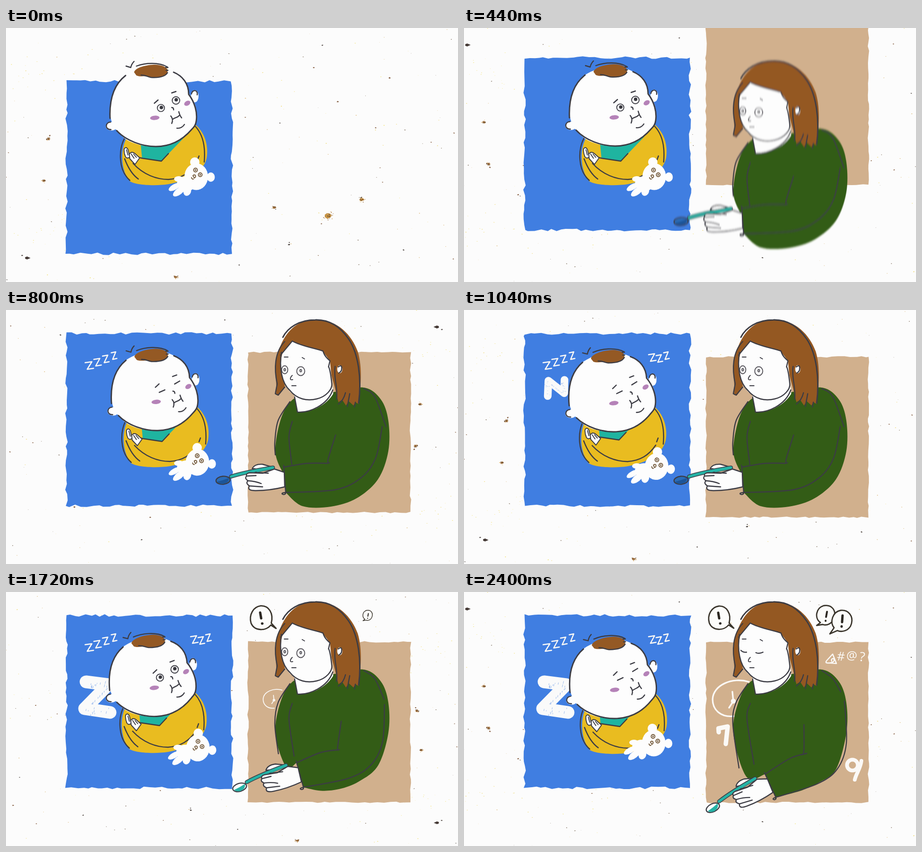
An HTML page for the animation above (2.44 s loop, 960x540 px).

```html
<!DOCTYPE html>
<html lang="en">
<head>
<meta charset="utf-8">
<title>Sleepy supper</title>
<style>
html, body { margin: 0; width: 100%; height: 100%; overflow: hidden; background: #fcfcfc; }
svg { display: block; width: 960px; height: 540px; }
.ln { fill: none; stroke: #3c3c44; stroke-width: 2.4; stroke-linecap: round; stroke-linejoin: round; }
.thin { stroke-width: 1.9; }
.bold { stroke-width: 2.9; }
.w { fill: #fdfdfd; }
.chalk { fill: none; stroke: #fbf9f6; stroke-width: 2.4; stroke-linecap: round; stroke-linejoin: round; }
.bub { fill: #fcfcfa; stroke: #3a352c; stroke-width: 2.8; stroke-linejoin: round; }
.bang { stroke: #2b2721; stroke-width: 5; stroke-linecap: round; }
text { font-family: "Open Sans", "Noto Sans", sans-serif; fill: #fbf9f6; }
</style>
</head>
<body>
<svg viewBox="0 0 960 540" xmlns="http://www.w3.org/2000/svg">
<defs>
  <filter id="blur" x="-10%" y="-10%" width="120%" height="120%"><feGaussianBlur id="blurAmt" stdDeviation="0 0"/></filter>
</defs>
<rect width="960" height="540" fill="#fcfcfc"/>
<g id="specks"></g>

<path id="tan" fill="#d1b08d"/>
<g id="clock" class="chalk" style="stroke-width:3.4">
  <path d="M605,191 C570,180 529,198 528,228 C528,252 547,267 573,264 M570,212 L572,232 L563,246"/>
  <circle cx="572" cy="232" r="3.5" fill="#fbf9f6"/>
</g>
<path id="seven" class="chalk" style="stroke-width:9.5" d="M541,298 L540.5,290 L560,286 L556,323"/>
<g id="nine" class="chalk" style="stroke-width:8"><circle cx="825" cy="368" r="11.5"/><path d="M844,359 C842,376 833,385 830,399"/></g>
<path id="swear0" class="chalk" d="M781,147 C779,142 785,139 786,144 C787,150 778,151 773,151 C767,151 768,148 772,144 L783,132 L791,152 L779,151"/>
<text id="swear1" x="792" y="146" font-size="26" transform="rotate(4 802 137)">#</text>
<text id="swear2" x="812" y="144" font-size="26">@</text>
<text id="swear3" x="840" y="147" font-size="27" transform="rotate(8 845 137)">?</text>

<path id="blue" fill="#407ee1"/>
<g id="zs"></g>
<g id="bigZ">
  <path d="M-26,-32 L21,-26 L-29,25 L25,33" fill="none" stroke="#fafafa" stroke-width="27" stroke-linecap="round" stroke-linejoin="round"/>
  <g id="scratch" stroke="#5a8fe4" stroke-width="1"></g>
</g>

<g id="body">
  <path fill="#e9bc20" d="M256,234 C243,258 243,300 262,325 C275,335 320,336 345,332 C385,325 425,305 427,270 C429,245 421,222 403,206 Z"/>
  <path class="ln" d="M252,234 C239,258 238,302 263,324 M252,278 C258,294 267,311 281,321 M270,288 C292,312 320,322 345,322 C372,320 390,309 405,287 M402,209 C418,226 424,252 421,285 M410,272 L407,280"/>
</g>
<g id="collar">
  <path fill="#1fb4a0" d="M286,246 L289,277 L330,283 L380,231 Z"/>
  <path class="ln" d="M281,275 L290,277 L330,283 L345,267"/>
</g>
<g id="palms" class="ln thin" style="fill:#fdfdfd">
  <path d="M251,257 Q255,251 259,258 L263,274 Q258,279 254,274 Q250,266 251,257Z M256,259 L259,270"/>
  <path d="M262,268 Q267,261 274,267 L284,276 L274,290 L263,278Z M266,268 L272,277 M271,268 L277,275"/>
</g>
<g id="head">
  <ellipse class="w" cx="401" cy="145" rx="8" ry="13"/>
  <ellipse class="w" cx="224" cy="209" rx="12" ry="9"/>
  <path class="w" d="M252,102 C232,116 221,145 221,180 C222,205 235,222 255,237 C280,252 320,257 350,247 C385,233 402,212 405,190 C406,165 397,150 388,138 C386,115 376,103 356,94 C330,78 285,80 252,102Z"/>
  <path class="ln bold" d="M254,101 C232,118 219,148 221,192 M235,218 C255,240 290,252 318,252 C350,252 375,238 394,216 C400,210 403,206 404,198 C407,180 401,158 388,141 C388,118 375,102 356,94"/>
  <path class="ln" d="M222,200 C211,200 209,216 223,216 M394,140 C396,130 408,131 406,142"/>
  <path fill="#945924" d="M272,94 C275,84 298,78 318,78 C336,79 345,86 343,93 C341,103 325,106 306,105 C299,100 286,105 277,101 Z"/>
  <path class="ln" d="M277,81 C295,74 325,72 343,83 M287,100 C298,100 300,104 308,105 C325,106 338,104 343,95 M339,84 L344,84 M340,90 L344,90 M255,81 L265,84 C266,79 268,75 272,71"/>
  <path class="ln" d="M315,160 L323,153 M352,138 L361,135 M352,169 Q356,169 356,174 M350,187 Q356,194 352,203 M354,194 C359,190 364,191 368,186 M367,178 Q369,186 373,191 M363,213 C370,214 376,210 379,205"/>
  <ellipse cx="316" cy="191" rx="10" ry="4.6" fill="#b582b8" transform="rotate(-4 316 191)"/>
  <ellipse cx="385" cy="160" rx="7" ry="4.8" fill="#b582b8" transform="rotate(-30 385 160)"/>
  <g id="babyOpen" class="ln thin">
    <circle cx="329" cy="170" r="7.6"/><circle cx="330" cy="169" r="2.8" fill="#333338"/>
    <circle cx="361" cy="154" r="8"/><circle cx="361.5" cy="152.5" r="2.8" fill="#333338"/>
  </g>
  <path id="babyShut" class="ln" d="M323,171 L335,166 M356,154 L367,148"/>
</g>
<g id="bearBody" class="w">
  <ellipse cx="383" cy="331" rx="20" ry="16"/>
  <ellipse cx="367" cy="321" rx="10" ry="6"/>
  <ellipse cx="358" cy="338" rx="14" ry="6" transform="rotate(-30 358 338)"/>
  <ellipse cx="368" cy="347" rx="16" ry="7" transform="rotate(-38 368 347)"/>
  <ellipse cx="385" cy="347" rx="8" ry="10" transform="rotate(20 385 347)"/>
</g>
<g id="bearHead">
  <g class="w"><ellipse cx="404" cy="316" rx="25" ry="28.5"/><circle cx="401" cy="285" r="10"/><ellipse cx="435" cy="317" rx="8.5" ry="10"/></g>
  <g fill="none" stroke="#73593a" stroke-width="1.9" stroke-linecap="round">
    <circle cx="402.5" cy="302" r="4"/><circle cx="402.5" cy="302" r=".8"/>
    <circle cx="412.5" cy="312" r="4"/><circle cx="412.5" cy="312" r=".8"/>
    <path d="M394,318 Q395,322 398,321 M397,314 L400,319 Q404,317 402,313 Q399,311 397,314"/>
  </g>
</g>

<g id="woman">
  <path id="torso" fill="#335c16"/>
  <path id="folds" class="ln"/>
  <g id="grip">
    <path class="ln w" style="fill:#fdfdfd" d="M523,337 Q528,327 545,328 L562,333 L545,340 Z"/>
    <path class="ln" style="stroke-width:8.5" d="M478,354 Q510,344 567,335"/>
    <path class="ln" style="stroke:#25b3a6;stroke-width:5.5" d="M478,354 Q510,344 567,335"/>
    <g transform="translate(461 362) rotate(-5)">
      <ellipse id="bowl" class="ln" rx="15" ry="8.5"/>
      <path id="dip" d="M-13,2 Q0,0 13,-4 Q12,6 0,8 Q-8,8 -13,2Z"/>
    </g>
    <path class="ln" style="fill:#fdfdfd" d="M511,353 Q509,347 518,346 L545,347 L570,338 L591,345 L592,376 Q560,384 530,384 Q511,384 517,374 Q508,368 514,363 Q506,358 511,353Z"/>
    <path class="ln" d="M511,353 L531,352 M514,363 Q530,364 542,369 M517,374 L545,376 M530,345 L557,347"/>
    <path style="stroke:#25b3a6;stroke-width:5.5" d="M533,342 L567,335"/>
  </g>
  <path class="w" d="M612,180 L619,217 C645,219 680,204 695,178 L692,150 Z"/>
  <path class="ln" d="M613,185 L619,217 C645,219 683,202 694,170"/>
  <path fill="#945822" d="M573,180 C578,158 564,112 583,76 C598,40 624,20 658,20 C705,21 734,53 747,88 C758,124 753,165 749,200 L742,196 L738,203 L728,194 L722,203 L714,191 L706,196 L697,160 L684,112 L608,66 L588,92 L592,165 L579,182 Z"/>
  <path class="w" d="M608,66 C626,76 650,80 673,88 L688,108 L693,160 C688,182 665,192 645,192 C618,191 598,172 591,156 C582,138 582,105 588,90 Z"/>
  <ellipse class="w" cx="709" cy="126" rx="5.5" ry="8.5"/>
  <path class="ln bold" d="M588,58 C598,38 622,21 657,21 C690,20 712,38 728,62 C748,92 756,145 749,198"/>
  <path class="ln" d="M592,67 C570,90 569,125 576,157 L572,178 L578,181 L592,164 M585,90 C580,122 585,155 603,171 C618,190 640,194 660,189 C681,184 693,168 692,157 C690,140 689,128 685,120 M583,96 L608,66 C625,76 650,80 673,87 C677,98 680,101 688,108 L685,121 M699,120 C695,146 706,166 702,190 M721,176 Q717,192 706,200 M730,178 L725,205 M742,196 L740,206 M706,121 Q713,115 713,124 Q713,131 707,134"/>
  <path class="ln thin" d="M591,100 L599,100 M629,101 L634,104 M608,139 C603,144 602,150 609,148 M607,161 L616,161"/>
  <g id="momOpen" class="ln thin" style="stroke:#55535a">
    <ellipse cx="592" cy="127" rx="6.5" ry="8.5"/><ellipse cx="592" cy="127" rx="1.8" ry="2.5"/>
    <ellipse cx="626" cy="130" rx="8.5" ry="9.5"/><ellipse cx="626" cy="129" rx="1.8" ry="2.5"/>
  </g>
  <path id="momShut" class="ln" d="M588,124 Q593,129 600,128 M620,129 Q627,132 635,128"/>
</g>

<g id="bub0"><path class="bub" d="M562,70 C552,83 528,83 521,66 C516,48 526,32 541,30 C559,29 568,47 563,66 L573,77 Z"/>
  <path id="bang0" class="bang" d="M541,44 L542,56 M543,67 L543.5,67"/></g>
<g id="bub1"><path class="bub" d="M757,65 C744,56 747,34 764,29 C782,26 791,40 786,55 C782,68 770,72 762,69 L749,71 Z"/>
  <path class="bang" d="M771,42 L769,53 M768,61 L768,61.5" style="stroke-width:4"/></g>
<g id="bub2"><path class="bub" d="M786,76 C776,64 783,42 800,39 C817,37 827,52 823,67 C819,83 802,86 793,82 L777,89 Z"/>
  <path class="bang" d="M804,50 L803,64 M802,73 L802,73.5"/></g>
</svg>
<script>
const LOOP = 2440, STEP = 40;
const $ = id => document.getElementById(id);
const clamp = v => Math.max(0, Math.min(1, v));
const mix = (a, b, p) => a + (b - a) * p;
const span = (t, from, to) => clamp((t - from) / (to - from));
const ease = (t, from, to) => { const p = span(t, from, to); return p * p * (3 - 2 * p); };
const show = (id, on) => { $(id).style.display = on ? '' : 'none'; };
const move = (id, x, y, extra = '') => $(id).setAttribute('transform', `translate(${x} ${y}) ${extra}`);

function make(tag, attrs, parent) {
  const el = document.createElementNS('http://www.w3.org/2000/svg', tag);
  for (const k in attrs) el.setAttribute(k, attrs[k]);
  parent.appendChild(el);
}

function rng(seed) {
  let s = seed * 7919 + 17;
  return () => {
    s = (s + 0x6D2B79F5) | 0;
    let r = Math.imul(s ^ (s >>> 15), 1 | s);
    r = (r + Math.imul(r ^ (r >>> 7), 61 | r)) ^ r;
    return ((r ^ (r >>> 14)) >>> 0) / 4294967296;
  };
}

// Smooth curve through points; a doubled point makes a corner
function curve(pts) {
  const at = i => pts[Math.max(0, Math.min(pts.length - 1, i))];
  const bend = (b, a, c, k) => [b[0] + (c[0] - a[0]) * k, b[1] + (c[1] - a[1]) * k];
  let d = 'M' + pts[0];
  for (let i = 0; i < pts.length - 1; i++) {
    const [a, b, c, e] = [at(i - 1), at(i), at(i + 1), at(i + 2)];
    d += `C${bend(b, a, c, 1 / 6)} ${bend(c, b, e, -1 / 6)} ${c}`;
  }
  return d;
}

// Torn paper edge
function torn(x, y, w, h, amp, seed) {
  const r = rng(seed), pts = [];
  const edge = (x0, y0, dx, dy, len) => {
    for (let s = 0; s < len - 5; s += 7 + r() * 8) {
      const j = (r() - .5) * 2 * amp;
      pts.push([x0 + dx * s + Math.abs(dy) * j, y0 + dy * s + Math.abs(dx) * j]);
    }
  };
  edge(x, y, 1, 0, w);
  edge(x + w, y, 0, 1, h);
  edge(x + w, y + h, -1, 0, w);
  edge(x, y + h, 0, -1, h);
  return 'M' + pts.join('L') + 'Z';
}

function speck(x, y, size, fill, r) {
  const pts = [];
  for (let i = 0; i < 7; i++) {
    const a = i / 7 * Math.PI * 2, q = size * (.6 + r() * .6);
    pts.push([x + Math.cos(a) * q * 1.15, y + Math.sin(a) * q * .8]);
  }
  make('polygon', { points: pts.join(' '), fill }, $('specks'));
}

function flake(x, y, size, r) {
  const tones = ['#b98a4c', '#8a5a2c', '#d9a85c', '#3d2d22'];
  speck(x, y, size * .85, size > 5 ? '#c59245' : '#95673a', r);
  for (let k = 0; k < size * 4; k++) {
    const a = r() * 6.28, q = r() * size * 1.2;
    speck(x + Math.cos(a) * q * 1.2, y + Math.sin(a) * q * .9, .5 + r() * .7, tones[k % 4], r);
  }
}

function buildSpecks() {
  const r = rng(5), x = () => r() * 1050 - 20, y = () => r() * 620 - 40;
  flake(685, 399, 9, r);
  flake(755, 365, 7, r);
  flake(570, 382, 4, r);
  flake(80, 325, 4, r);
  flake(90, 236, 4, r);
  flake(361, 529, 4, r);
  speck(46, 489, 4.6, '#453a36', r);
  for (let i = 0; i < 42; i++) speck(x(), y(), 1 + r() * r() * 2, i % 3 ? '#80583a' : '#4a413c', r);
  const tiny = ['#f2e27a', '#efd873', '#7a6a58', '#d8b06a'];
  for (let i = 0; i < 200; i++) speck(x(), y(), .4 + r() * .8, tiny[i % 4], r);
  for (let i = 0; i < 40; i++) speck(75 + (r() - r()) * 75, (i % 2 ? 100 : 425) + (r() - r()) * 55, .5 + r() * .5, tiny[i % 2], r);
}
const FLIPS = ['scale(1)', 'translate(-38 525) scale(1 -1)', 'translate(957.5 31) scale(-.94 .94)', 'translate(960 525) scale(-1)'];

function buildZs() {
  for (let i = 0; i < 7; i++) {
    const j = i - 4, left = i < 4;
    const x = left ? 168 + 18.5 * i : 392 + 16 * j, y = left ? 110 - 7 * i : 93 + 4 * (j % 2) - 2 * j;
    const w = left ? 18 - 2 * i : 16 - 2 * j, h = 16;
    make('path', { id: 'z' + i, class: 'chalk', d: `M${x},${y + 2} l${w * .8},-2 l${-w * .55},${h} l${w * .75},-2` }, $('zs'));
  }
  const r = rng(9);
  for (let i = 0; i < 34; i++) {
    const u = r() * 2 - 1, row = i % 3 - 1, n = 2 + r() * 4;
    const y = row ? row * 29 + (r() - .5) * 16 : -u * 20;
    make('path', { d: `M${u * (row ? 28 : 20)},${y} l${-n * .2},${n}`, opacity: .6 }, $('scratch'));
  }
}

function pop(id, t, start, x, y) {
  show(id, t >= start);
  const p = span(t, start - STEP, start + 120);
  const s = 1 + Math.sin(p * Math.PI) * .12 - (1 - p) * (1 - p);
  move(id, x, y, `scale(${s}) translate(${-x} ${-y})`);
}

function drawPanels(t) {
  const seed = Math.floor(t / 80);
  $('blue').setAttribute('d', torn(128.5, 113.5 - 63.5 * ease(t, 195, 540), 351.5, 366.5, 2.8, seed + 1));
  const drop = 1 - span(t, 300, 540);
  const tanY = 106.5 - 41 * Math.exp(-Math.max(0, t - 560) / 271) - 420 * drop * drop;
  show('tan', t > 300);
  $('tan').setAttribute('d', torn(514, tanY, 345, 341, 1.6, seed + 101));
}

function drawBaby(t) {
  const sway = 3 * ease(t, 0, 280) - 4 * ease(t, 900, 1400) + 5 * ease(t, 2000, 2400);
  const tuck = ease(t, 560, 1040), sink = 8 * ease(t, 1000, 1400) + 2 * ease(t, 2000, 2400);
  move('head', sway, 18 * span(t, 560, 2400) ** .6 - ease(t, 0, 280), `rotate(${-2.8 * tuck} 316 191)`);
  move('body', sway, sink);
  move('collar', sway - 3 * tuck, sink - 7 * tuck);
  move('palms', sway + 4 * tuck, sink - 3 * tuck);

  const lift = ease(t, 1400, 2400), dip = 13 * ease(t, 480, 1250) - 14 * lift;
  move('bearBody', -6 * lift, dip);
  move('bearHead', 5 * tuck - 6 * lift, dip + 6 * tuck, `rotate(${9 * tuck * (1 - lift)} 404 316)`);

  const asleep = (t >= 480 && t < 1240) || t >= 2320;
  show('babyOpen', !asleep);
  show('babyShut', asleep);
}

// The sleeve ends where the turning hand begins
function drawArm(p) {
  const px = 568, py = 334, dx = 51 * p, dy = 61 * p, turn = -20.5 * p;
  move('grip', dx, dy, `rotate(${turn} ${px} ${py})`);
  const c = Math.cos(turn * Math.PI / 180), s = Math.sin(turn * Math.PI / 180);
  const held = (x, y) => [px + dx + (x - px) * c - (y - py) * s, py + dy + (x - px) * s + (y - py) * c];
  const at = (ax, ay, bx, by) => [mix(ax, bx, p), mix(ay, by, p)];
  const top = held(590, 334), end = held(594, 388);

  $('torso').setAttribute('d', curve([
    [640, 190], [612, 188], [585, 228], [572, 300], at(588, 345, 600, 393), top, top, end, end,
    at(630, 417, 700, 427), at(690, 418, 722, 420), at(745, 400, 752, 406), at(790, 360, 790, 377),
    [812, 300], [812, 235], [796, 190], [760, 165], [694, 175], [640, 190]
  ]));
  $('folds').setAttribute('d', [
    [[603, 195], [578, 235], [571, 280], at(572, 308, 584, 374)],
    [[608, 237], [601, 270], at(607, 328, 616, 366)],
    [top, at(640, 326, 692, 354), at(684, 326, 728, 343)],
    [at(700, 266, 722, 282), at(684, 318, 722, 335), at(687, 325, 719, 346)],
    [top, top, end, end, at(700, 382, 750, 408), at(755, 356, 793, 376), at(785, 315, 812, 322), at(799, 248, 808, 232)],
    [[760, 167], [783, 184], at(807, 248, 800, 212)]
  ].map(curve).join(''));

  $('bowl').style.fill = p < .35 ? '#2a6cb8' : '#fdfdfd';
  $('dip').style.fill = p < .35 ? '#1c5599' : '#25b3a6';
}

function drawWoman(t) {
  const rise = u => 545 * (1 - ease(u, 155, 505));
  const speed = Math.abs(rise(t + 10) - rise(t - 10)) / 20;
  move('woman', 0, rise(t));
  $('blurAmt').setAttribute('stdDeviation', `0 ${speed * 1.4}`);
  if (speed > .05) $('woman').setAttribute('filter', 'url(#blur)');
  else $('woman').removeAttribute('filter');
  drawArm(ease(t, 1540, 1880));
  show('momOpen', t < 2320);
  show('momShut', t >= 2320);
}

function drawMarks(t) {
  for (let i = 0; i < 7; i++) show('z' + i, t >= 680 + i * 40);
  const roll = ease(t, 1040, 1320);
  show('bigZ', t >= 920);
  move('bigZ', 196, mix(166, 223, roll), `rotate(${84 * (1 - roll)}) scale(${.6 * span(t, 880, 1040) + .4 * roll})`);

  pop('clock', t, 1720, 566, 228);
  pop('seven', t, 1880, 550, 304);
  pop('nine', t, 2160, 828, 377);
  pop('bub0', t, 1640, 545, 56);
  pop('bub1', t, 1720, 768, 50);
  pop('bub2', t, 1800, 802, 63);
  $('bang0').setAttribute('transform', `rotate(${-5 - 25 * (Math.floor(t / 400) % 2)} 542 56)`);
  for (let i = 0; i < 4; i++) show('swear' + i, t >= 2120 + i * 60);
}

function render(t) {
  $('specks').setAttribute('transform', FLIPS[Math.floor(t / 250) % 4]);
  drawPanels(t);
  drawBaby(t);
  drawWoman(t);
  drawMarks(t);
}

buildSpecks();
buildZs();
const begin = performance.now();
function tick() {
  const t = Math.max(0, performance.now() - begin) % LOOP;
  render(Math.floor(t / STEP) * STEP);
  requestAnimationFrame(tick);
}
render(0);
requestAnimationFrame(tick);
</script>
</body>
</html>
```
